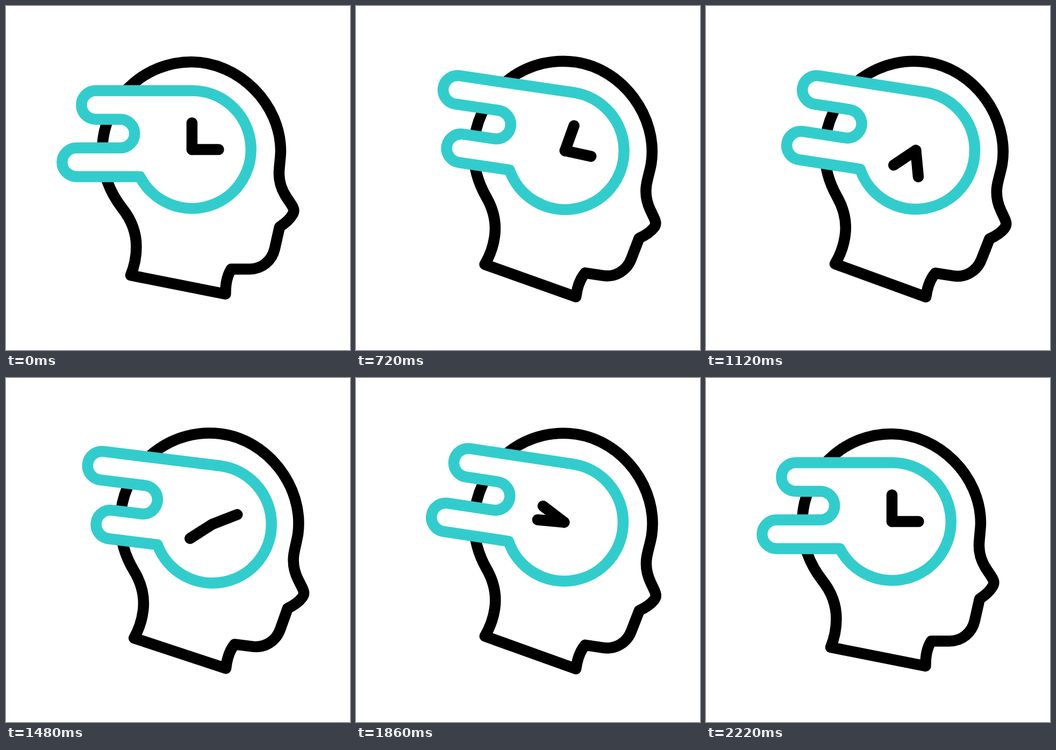
Write an HTML page that moves like this. It is 640 px wide and 640 px high and loops after 2.4 s.

```html
<!DOCTYPE html>
<html lang="en">
<head>
<meta charset="utf-8">
<title>Thinking time</title>
<style>
  html, body { margin: 0; width: 100%; height: 100%; overflow: hidden; background: #fff; }
  svg { display: block; width: 100vw; height: 100vh; }
  path { stroke-width: 20.5; stroke-linecap: round; stroke-linejoin: round; stroke: #000; fill: none; }
  #bubble { stroke: #33cccc; fill: #fff; }
</style>
</head>
<body>
<svg viewBox="0 0 640 640">
  <path id="head" d="M232 501Q242.500 475 242.500 448C242.500 421 232 396 216 376C192 345 179 308 179 270
    A166 166 0 0 1 345 104C433 104 511 182 511 270C511 282 508 299 508 312C508 330 514 344 522 356L530 368
    C536 377 537 381 533 388Q526 400 509 411L500 451C495 474 476 489.500 453 489.500
    H419Q408 507 408.500 536Z"/>
  <g id="clock">
    <path id="bubble"/>
    <path id="hour" d="M0 0V-49.500"/>
    <path id="minute" d="M0 0H49.500"/>
  </g>
</svg>
<script>
const LOOP = 2400, START = 200, END = 2200, RAMP = 400;
const R = 109.5, r = 26.65;

const $ = id => document.getElementById(id);
const [head, clock, bubble, hour, minute] = ['head', 'clock', 'bubble', 'hour', 'minute'].map($);

const clamp = (v, min = 0, max = 1) => Math.min(max, Math.max(min, v));
const ease = v => { const p = clamp(v); return p * p * (3 - 2 * p); };

// 0 to 1 and back once per period, only between the two ramps
function wave(t, period) {
  const s = clamp(t, START + RAMP, END - RAMP) - START - RAMP;
  return (1 - Math.cos(2 * Math.PI * s / period)) / 2;
}

// outline around the clock centre; up and low are the finger ends
function bubblePath(up, low) {
  const y = -R, d = 2 * r;
  const arc = (x, level, sweep) => `H${x}A${r} ${r} 0 0 ${sweep} ${x} ${y + level * d}`;
  return `M0 ${y}A${R} ${R} 0 1 1 -97 ${y + 3 * d}` +
    arc(low, 2, 1) + arc(-133.4, 1, 0) + arc(up, 0, 1) + 'Z';
}

function draw(t) {
  const lean = ease((t - START) / RAMP) * ease((END - t) / RAMP);
  const nod = wave(t, 600), reach = wave(t, 800);
  const angle = lean * (9.1 - 2.1 * nod);

  // the clock runs a little ahead of the head on both ramps
  const swing = 4 * lean * (1 - lean);
  const lead = t < LOOP / 2 ? swing : -swing;
  const x = 346 + lean * (45.5 - 7.5 * nod) + 6 * lead;
  const y = 267 + lean * (0.8 + 4.2 * nod) + 2.8 * swing;

  head.setAttribute('transform', `rotate(${angle} 374 543)`);
  clock.setAttribute('transform', `translate(${x} ${y}) rotate(${angle})`);
  bubble.setAttribute('d', bubblePath(
    -179 - lean * (41 - 26 * reach),
    -215 + lean * (30 - 34.6 * reach)));

  const turn = clamp((t - START) / (END - START)) * 360;
  hour.setAttribute('transform', `rotate(${turn})`);
  minute.setAttribute('transform', `rotate(${turn * 3})`);
}

const begin = performance.now();
function tick() {
  draw((performance.now() - begin) % LOOP);
  requestAnimationFrame(tick);
}
tick();
</script>
</body>
</html>
```
